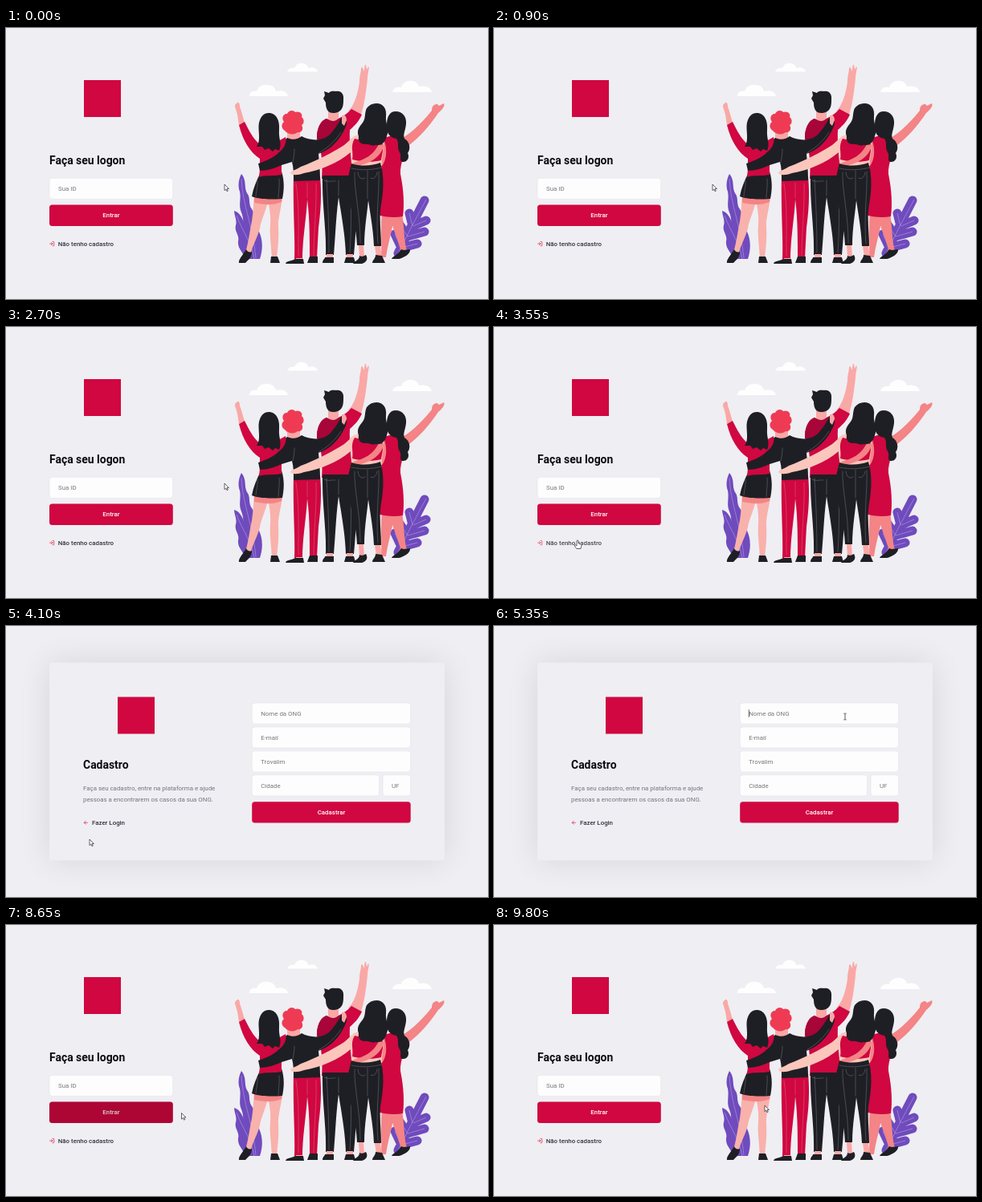
Write an HTML page that moves like this. It is 600x338 px and loops after 9.85 s.

```html
<!DOCTYPE html>
<html lang="pt-BR">
<head>
<meta charset="utf-8">
<title>Logon</title>
<style>
html,body{margin:0;width:100%;height:100%;overflow:hidden;background:#efeef3}
svg{display:block;width:100vw;height:100vh}
text{font-family:Roboto,sans-serif;font-size:7.9px}
.title{font-size:13.95px;font-weight:700;fill:#0c0c10}
.hint{fill:#77777c}
.para{fill:#737380}
.link text{font-weight:500;fill:#33333d}
.btn text{font-weight:500;fill:#fff;text-anchor:middle}
.box{fill:#fdfdfe;stroke:#dcdce6;stroke-width:.5}
.icon{fill:none;stroke:#e02041;stroke-width:2.4;stroke-linecap:round;stroke-linejoin:round}
.red{fill:#d00740}.deep{fill:#a80538}.ink{fill:#1e1f24}.leaf{fill:#6f4bbd}
.skin{fill:#f9a8a6}.pale{fill:#fbc6bb}.blush{fill:#f9b1ab}.rose{fill:#f48486}
.lobes{fill:none;stroke:#6f4bbd;stroke-width:11;stroke-linecap:round}
.seam{fill:none;stroke:#fff;stroke-width:.5;opacity:.4;stroke-linecap:round}
.vein{fill:none;stroke:#c9b8ee;stroke-width:.6;opacity:.75}
.cloud{fill:#fefefe}
</style>
</head>
<body>
<svg viewBox="0 0 600 338" preserveAspectRatio="none">
<defs><filter id="soft" x="-30%" y="-50%" width="160%" height="200%"><feGaussianBlur stdDeviation="20"/></filter></defs>

<g id="login">
  <rect class="red" x="97" y="65" width="46" height="46"/>
  <text class="title" x="54" y="169.8">Faça seu logon</text>
  <g id="loginForm"></g>
  <g class="link" id="joinLink">
    <g class="icon" transform="translate(53.6 265.6) scale(.293)"><path d="M15 3h4a2 2 0 0 1 2 2v14a2 2 0 0 1-2 2h-4M10 17l5-5-5-5M15 12H3"/></g>
    <text x="64.7" y="272">Não tenho cadastro</text>
  </g>

  <g id="art">
    <g class="cloud">
      <path d="M303 85C303 80 307 78 312 79C314 73 320 70 326 71C332 71 335 75 336 79C343 77 350 79 351 85Z"/>
      <path d="M350 54.5C351 51 355 49 359 50C361 45 365 43 369 44C373 44 376 47 376 50C382 48 387 50 388 54.5Z"/>
      <path d="M481 80C482 75 487 73 492 74C494 68 500 65 506 66C511 67 513 70 514 73C522 71 529 74 530 80Z"/>
    </g>
    <path class="leaf" d="M293 182C300 190 296 199 300 206C305 212 301 219 306 226C312 234 309 244 314 252C320 263 320 276 316 288H305C301 276 302 267 298 257C294 247 297 240 293 230C289 220 293 214 291 204C288 196 290 188 293 182Z"/>
    <path class="leaf" d="M284 228C291 230 294 237 296 242C301 246 300 252 305 258C312 267 318 277 315 288H297C296 279 288 276 289 266C291 258 284 254 286 246C288 240 284 234 284 228Z"/>
    <path class="lobes" d="M488 281Q502 252 521 215M506 247L502 231M500 260L488 242M492 274L484 257M507 247L523 240M500 260L521 254M493 274L512 269"/>
    <path class="vein" d="M293 188C295 223 307 245 311 287M287 234C294 253 306 268 309 288M523 214Q502 252 487 284M506 247L502 231M500 260L488 242M492 274L484 257M507 247L523 240M500 260L521 254M493 274L512 269"/>

    <!-- first woman -->
    <path class="skin" d="M290 121L288 108L285 98C285 94 287 95 288 93C290 92 291 95 291 98L293 104L297 118Z"/>
    <path class="red" d="M290 121L297 117C302 127 308 139 316 145L339 143C346 146 352 142 358 139L362 149L343 162V181L316 185L316 163C304 155 295 141 290 121Z"/>
    <path class="blush" d="M309 209L327 211C324 229 317 240 316 250C312 264 307 271 305 280H298C302 267 303 255 306 241C308 228 308 219 309 209ZM326 211L344 210C343 225 338 237 339 249C340 264 338 276 337 287H331C330 271 328 260 329 245C330 231 327 222 326 211Z"/>
    <path class="rose" d="M309 209H344L343 217C331 222 320 220 309 218Z"/>
    <path class="ink" d="M316 182L343 179C347 191 346 203 344 213C331 214 316 214 306 210C308 199 312 190 316 182ZM299 276C301 280 303 280 306 279C306 286 302 289 298 293H290C289 289 295 283 299 276ZM330 285H338L341 293H329Z"/>
    <path class="red" d="M316 176C325 173 335 177 343 176V183C333 185 324 183 315 186Z"/>
    <path class="seam" d="M313 190C314 198 311 204 311 210M340 188C341 197 339 204 339 212"/>

    <!-- fifth woman -->
    <path class="rose" d="M492 138C506 130 519 117 530 103C530 96 534 95 537 95L539 97L545 94C547 97 543 102 538 106C528 121 515 137 498 149Z"/>
    <path class="rose" d="M468 230L483 233C482 250 476 265 473 286H467C468 268 466 250 468 230ZM478 231L493 231C496 248 495 264 499 278L492 281C488 262 480 250 478 231Z"/>
    <path class="ink" d="M492 276C496 278 499 276 503 276C504 282 494 287 489 288H480C482 284 488 283 492 276Z"/>
    <path class="red" d="M468 139C478 132 490 133 497 142C499 155 490 168 491 182C495 202 496 220 494 235C484 237 472 236 462 233V170Z"/>
    <path class="ink" d="M485 104C494 104 499 111 498 120C497 129 494 132 496 138C503 142 504 151 500 156C503 162 499 168 493 167C489 165 493 160 490 155C486 149 490 144 486 138C477 137 473 130 474 121C474 110 478 104 485 104Z"/>

    <!-- tall man -->
    <path class="skin" d="M426 104C433 97 438 83 440 67C440 59 442 56 442 50C443 47 445 52 446 54C446 48 447 45 448 46L449 52L451 48C453 49 450 56 450 63C448 81 446 97 441 111Z"/>
    <path class="red" d="M399 113C404 116 410 116 414 113C420 110 426 106 430 101L443 108C439 117 433 123 428 127C427 145 430 165 432 187L393 188C395 165 391 146 387 132C389 121 393 115 399 113Z"/>
    <path class="deep" d="M399 113C404 116 410 116 414 113L422 110C419 122 413 134 404 143L387 139C387 122 393 115 399 113Z"/>
    <path class="skin" d="M401 100H414V112C411 117 404 117 401 113Z"/>
    <path class="ink" d="M394 184H434C438 218 436 251 433 283H423C422 256 417 230 414 211C411 233 410 259 408 283H398C399 251 393 219 394 184Z"/>
    <path class="skin" d="M399 282H407V288H399ZM424 282H432V288H424Z"/>
    <path class="ink" d="M397 286H408V293H394C394 289 397 288 397 286ZM423 286H433L435 293H421Z"/>
    <path class="seam" d="M399 189C401 219 402 250 402 280M428 190C430 220 430 250 428 280M414 190V209M396 190C402 193 407 190 410 191"/>
    <path class="ink" d="M397 84L396 79L402 81C404 78 408 79 411 79C417 78 421 82 420 90C420 97 419 105 409 106C400 107 398 100 398 93L395 88Z"/>

    <!-- man with curls -->
    <path class="skin" d="M350 124H366V142H350Z"/>
    <path class="red" d="M358 185L391 185C393 208 392 226 389 249L387 287H378C378 262 378 235 375 214C374 237 369 262 369 288H359C360 260 357 226 358 185Z"/>
    <path class="skin" d="M361 287H369V291H361ZM379 286H387V290H379Z"/>
    <path class="ink" d="M360 288H370L371 294H348C349 290 355 291 360 288ZM378 285H388V293H375Z"/>
    <path class="ink" d="M350 137C357 140 363 139 368 135C379 141 394 141 402 134C410 126 415 117 419 109C424 109 426 117 422 125C415 140 404 152 389 157C390 167 391 178 391 190L358 191C358 182 358 174 356 167L343 171C334 175 326 178 316 178L314 169C326 165 337 160 342 152C344 146 346 140 350 137Z"/>
    <path class="red" d="M339 141L348 136C350 143 346 150 340 155Z"/>
    <path class="skin" d="M418 110C421 107 424 110 424 115L421 122L418 119Z"/>
    <path class="seam" d="M359 151C359 158 358 162 357 167M389 156C400 150 410 141 417 130M361 194C365 220 364 255 364 284M386 194C387 221 383 256 383 284M375 193V212"/>
    <path class="ink" d="M327 106C337 106 341 116 340 127C339 138 344 144 340 153L335 151L332 154L327 150L322 152L319 148L312 148C318 140 313 127 315 118C317 110 321 106 327 106Z"/>
    <path fill="#ee3b53" d="M347 128C342 125 343 119 346 117C342 112 346 106 350 107C352 102 358 102 360 105C365 103 370 107 368 111C372 114 371 120 368 121C371 126 368 131 363 130C359 134 351 133 347 128Z"/>

    <!-- woman with long hair -->
    <path class="rose" d="M468 134C476 149 474 166 467 173L461 171V140Z"/>
    <path class="pale" d="M433 135C442 131 462 131 469 137C472 150 467 162 468 172H430C431 164 430 160 429 155C414 168 390 178 371 181C363 184 356 184 354 181C355 177 360 178 367 173C386 166 407 155 421 146C426 142 429 138 433 135Z"/>
    <path class="red" d="M434 138C444 141 456 140 466 137C472 148 468 157 467 165C456 168 443 167 431 164C433 154 428 148 434 138Z"/>
    <path class="rose" d="M470 146C469 158 455 168 442 171C437 174 432 174 430 172C431 167 438 167 444 164C454 160 460 153 464 145Z"/>
    <path class="ink" d="M430 169C442 173 456 172 466 168C471 184 470 203 467 220C464 237 467 253 467 272H458C457 251 454 235 451 215C449 235 446 251 446 271H437C436 249 430 229 426 209C423 194 427 181 430 169Z"/>
    <path class="skin" d="M439 271H445L446 286H440ZM459 272H466L468 286H461Z"/>
    <path class="ink" d="M440 284C443 286 446 284 448 283C451 288 449 292 443 294H432C434 290 440 290 440 284ZM460 283L468 284L472 293H456C456 289 460 288 460 283Z"/>
    <path class="seam" d="M430 175C443 178 456 177 468 174M434 180C433 202 441 231 441 268M464 179C465 205 460 235 463 269M450 178V213M438 180C439 189 444 189 447 187M454 187C457 189 461 187 462 180"/>
    <path class="ink" d="M461 94C470 94 474 101 473 110C472 119 478 126 474 135C472 143 467 147 460 146C455 148 451 144 447 145C441 145 438 141 439 135C436 128 440 123 444 118C448 113 446 106 449 100C452 96 456 94 461 94Z"/>
  </g>
</g>

<g id="signup">
  <rect x="54" y="45.5" width="492" height="247" opacity=".1" filter="url(#soft)"/>
  <rect x="54" y="45.5" width="492" height="247" rx="3.5" fill="#efeef3"/>
  <rect class="red" x="139" y="88.5" width="46" height="46"/>
  <text class="title" x="96" y="177.7">Cadastro</text>
  <text class="para" x="96" y="204.6">Faça seu cadastro, entre na plataforma e ajude</text>
  <text class="para" x="96" y="218.6">pessoas a encontrarem os casos da sua ONG.</text>
  <g class="link" id="backLink">
    <g class="icon" transform="translate(95.8 241.8) scale(.293)"><path d="M19 12H5M12 19l-7-7 7-7"/></g>
    <text x="107" y="248.2">Fazer Login</text>
  </g>
  <g id="signupForm"></g>
  <path id="caret" d="M317.3 104.3V113.7" stroke="#222" stroke-width=".7"/>
</g>

<g id="pointer" stroke-linejoin="round">
  <path id="arrow" d="M0 0V7.6L1.8 6L3 8.7L4.3 8.1L3.1 5.5H5.4Z" fill="#fff" stroke="#25252c" stroke-width=".7"/>
  <path id="hand" d="M-1 .6Q0-.6 1 .6V4L4 4.8Q5 5.2 4.8 6.5L4 10.5H-1.2L-3.6 7Q-3.8 5.7-2.6 5.8L-1 7Z" fill="#fff" stroke="#25252c" stroke-width=".7"/>
  <path id="beam" d="M-1.7-4H-.5L0-3.5L.5-4H1.7M0-3.5V3.5M-1.7 4H-.5L0 3.5L.5 4H1.7" fill="none" stroke="#33333a" stroke-width=".8"/>
</g>
</svg>
<script>
const LOOP = 9850, SIGNUP = 3850, LOGIN = 8200, FOCUS = 4900, FADE = 200;
const $ = id => document.getElementById(id);
const clamp = v => Math.max(0, Math.min(1, v));
const show = (id, on) => $(id).setAttribute('visibility', on ? 'inherit' : 'hidden');

const rect = (x, y, w, h, attrs) =>
  `<rect x="${x}" y="${y}" width="${w}" height="${h}" rx="3.5" ${attrs}/>`;
const field = (x, y, w, label) =>
  rect(x, y, w, 26.2, 'class="box"') + `<text class="hint" x="${x + 11}" y="${y + 15.8}">${label}</text>`;
const button = (x, y, w, label, id) =>
  `<g class="btn">${rect(x, y, w, 26.4, 'class="red"')}<text x="${x + w / 2}" y="${y + 15.9}">${label}</text>` +
  rect(x, y, w, 26.4, `id="${id}" opacity="0"`) + '</g>';

$('loginForm').innerHTML = field(54, 187.2, 153.8, 'Sua ID') + button(54, 220.5, 153.8, 'Entrar', 'shade');
$('signupForm').innerHTML =
  ['Nome da ONG', 'E-mail', 'Trovalim'].map((s, i) => field(306.2, 96 + 29.9 * i, 197.5, s)).join('') +
  field(306.2, 185.7, 158.5, 'Cidade') + field(469, 185.7, 34.7, 'UF') +
  button(306.2, 219.2, 197.5, 'Cadastrar', 'shade2');

// Clickable and typing areas per page: left, top, right, bottom, pointer
const zones = {
  login: [[54, 187, 208, 213, 'beam'], [54, 220.6, 208, 247, 'hand'], [54, 264, 133, 274, 'hand']],
  signup: [[306, 96, 504, 122, 'beam'], [306, 126, 504, 152, 'beam'], [306, 156, 504, 182, 'beam'],
    [306, 186, 465, 212, 'beam'], [469, 186, 504, 212, 'beam'], [306, 219, 504, 246, 'hand'], [96, 241, 149, 250, 'hand']]
};

// Pointer stops: time, x, y
const stops = [[0, 272, 195], [3050, 272, 195], [3500, 104, 266], [4150, 104, 266], [4850, 437, 113],
  [6900, 437, 113], [7700, 114, 238], [7850, 118, 244], [8350, 118, 244], [8640, 218.5, 234.5],
  [8720, 218.5, 234.5], [9150, 337, 225], [LOOP, 337, 225]];

function place(t) {
  const i = stops.findIndex(s => s[0] > t);
  const [t0, x0, y0] = stops[i - 1], [t1, x1, y1] = stops[i];
  const u = (t - t0) / (t1 - t0), e = u * u * (3 - 2 * u);
  return [x0 + (x1 - x0) * e, y0 + (y1 - y0) * e];
}

// Level of a hover fade that starts at a and reverses at b
const hover = (t, a, b) =>
  t < a ? 0 : clamp(Math.min(t - a, b - a, FADE) / FADE - Math.max(0, t - b) / FADE);

function draw(t) {
  const page = t >= SIGNUP && t < LOGIN ? 'signup' : 'login';
  show('login', page === 'login');
  show('signup', page === 'signup');

  const [x, y] = place(t);
  const zone = zones[page].find(z => x >= z[0] && x <= z[2] && y >= z[1] && y <= z[3]);
  const kind = zone ? zone[4] : 'arrow';
  for (const k of ['arrow', 'hand', 'beam']) show(k, k === kind);
  $('pointer').setAttribute('transform', `translate(${x.toFixed(2)} ${y.toFixed(2)})`);

  $('shade').setAttribute('opacity', .2 * Math.max(hover(t, 3240, 3350), hover(t, LOGIN, 8620)));
  $('joinLink').setAttribute('opacity', 1 - .2 * hover(t, 3430, SIGNUP));
  $('backLink').setAttribute('opacity', 1 - .2 * hover(t, 7760, LOGIN));
  show('caret', page === 'signup' && t >= FOCUS && Math.floor((t - FOCUS) / 530) % 2 === 0);
}

function tick() {
  draw(performance.now() % LOOP);
  requestAnimationFrame(tick);
}
tick();
</script>
</body>
</html>
```
